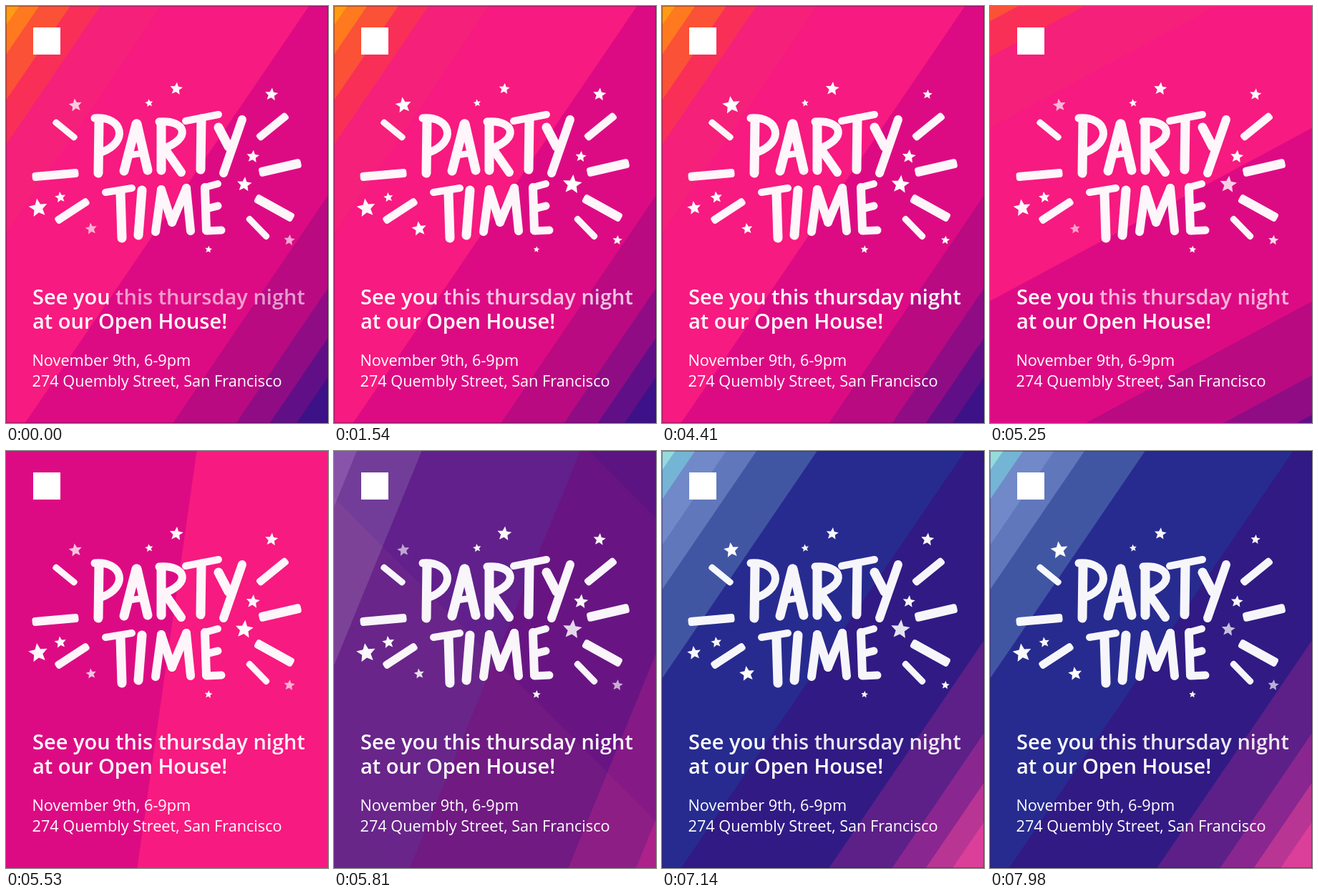
Recreate the animation shown at these times as an HTML page with a canvas. Size 450 px wide and 584 px high, loop 8000 ms.

```html
<!DOCTYPE html>
<html lang="en">
<head>
<meta charset="utf-8">
<title>Party time</title>
<style>
html, body { margin: 0; width: 100%; height: 100%; overflow: hidden; }
canvas { display: block; width: 450px; height: 584px; }
</style>
</head>
<body>
<canvas id="stage" width="450" height="584"></canvas>
<script>
const W = 450, H = 584, LOOP = 8000, STEP = 70;
const ctx = document.getElementById('stage').getContext('2d');
const TAU = Math.PI * 2, DEG = TAU / 360;
const clamp = (v, a = 0, b = 1) => Math.min(b, Math.max(a, v));
const mix = (a, b, u) => a + (b - a) * u;

function layer() {
  const c = document.createElement('canvas');
  c.width = W;
  c.height = H;
  return c;
}

// ---- background: parallel bands, placed by distance from the centre ----
const LEAN = 34.2 * DEG;
const CUTS = [-335, -312, -276, -241, -171, 0, 171, 244, 283, 314];
const PINK = ['#ff9c12', '#ff7a1e', '#fb5136', '#f92f58', '#f5207a', '#f71a80',
  '#dd0b83', '#b90a82', '#900c84', '#610f86', '#3d1188'];
const BLUE = ['#96dbdc', '#74b4d4', '#7189c8', '#6077bc', '#4156a3', '#272b8f',
  '#311a84', '#5c2088', '#8a2690', '#b93593', '#db3f9a'];
const bandLayer = layer();

function bands(colors, turn, zoom, alpha) {
  const g = bandLayer.getContext('2d');
  g.setTransform(1, 0, 0, 1, W / 2, H / 2);
  g.rotate(LEAN + turn * DEG);
  g.scale(zoom, zoom);
  colors.forEach((color, i) => {
    const from = i ? CUTS[i - 1] : -900;
    g.fillStyle = color;
    g.fillRect(from, -900, 900 - from, 1800);
  });
  ctx.globalAlpha = alpha;
  ctx.drawImage(bandLayer, 0, 0);
  if (zoom === 1) {
    ctx.strokeStyle = 'rgba(50,10,60,.4)';
    ctx.strokeRect(0.5, 0.5, W - 1, H - 1);
  }
}

function background(t) {
  const fade = clamp((t - 5600) / 310);
  if (fade < 1) {
    // speeds up, then spins at a steady rate
    const s = Math.max(0, t - 5110), ramp = 162, speed = 0.454;
    const turn = s < ramp ? speed * s * s / (2 * ramp) : speed * (s - ramp / 2);
    bands(PINK, turn, 1 + 0.75 * clamp(s / 420), 1);
  }
  if (fade > 0) {
    const left = Math.max(0, (6090 - t) / 280) ** 2;
    bands(BLUE, -12 * left, 1 + 0.2 * left, fade);
  }
}

// ---- lettering ----
const lettering = layer();
const pen = lettering.getContext('2d');
pen.strokeStyle = pen.fillStyle = '#fff';
pen.lineCap = pen.lineJoin = 'round';

function line(width, x0, y0, x1, y1) {
  pen.lineWidth = width;
  pen.beginPath();
  pen.moveTo(x0, y0);
  pen.lineTo(x1, y1);
  pen.stroke();
}

// a rounded bowl from a stem, bulging to the right
function bowl(x, y, right, bottom, endX) {
  pen.lineWidth = 11;
  pen.beginPath();
  pen.moveTo(x, y);
  pen.bezierCurveTo(right, y - 3, right + 8, bottom - 14, endX, bottom);
  pen.stroke();
}

function party() {
  line(13, 130, 160, 129, 234);
  bowl(124, 157, 164, 205, 133);
  line(13, 182, 165, 165, 231);
  line(13, 183, 165, 198, 230);
  line(9, 172, 209, 192, 206);
  line(13, 217, 164, 217, 230);
  bowl(214, 162, 252, 200, 219);
  line(12, 222, 200, 245, 233);
  line(10, 251, 161, 297, 152);
  line(13, 273, 158, 272, 229);
  line(13, 297, 170, 311, 197);
  line(12, 330, 159, 304, 234);
}

function time() {
  line(10, 139, 261, 176, 255);
  line(13, 160, 262, 162, 325);
  line(13, 190, 258, 185, 321);
  line(12, 217, 257, 209, 316);
  line(12, 217, 257, 232, 303);
  line(12, 252, 255, 232, 303);
  line(12, 252, 255, 258, 315);
  line(12, 278, 254, 280, 314);
  line(10, 278, 254, 296, 249);
  line(11, 280, 284, 296, 280);
  line(11, 280, 315, 301, 314);
}

function ray(x, y, length, thick, angle) {
  pen.save();
  pen.translate(x, y);
  pen.rotate(angle * DEG);
  pen.beginPath();
  pen.roundRect(-length / 2, -thick / 2, length, thick, 4);
  pen.fill();
  pen.restore();
}

function rays() {
  ray(82.5, 173.5, 41, 9, 39);
  ray(69, 236.5, 65, 12, -5);
  ray(92.5, 287, 54, 11, -33);
  ray(372.5, 169, 53, 11, -39);
  ray(383, 226.5, 60, 13, -13);
  ray(375, 283, 60, 13, 29);
  ray(352, 310.5, 42, 9, 46);
}

party();
time();
rays();

// ---- stars: each follows a beat, 0 = smallest, 1 = largest ----
const KEYS = [0, 1540, 4410, 5530, 5810, 7140, 7980];
const SHARED = [.5, 0, .8, .8, 1, .4, .3];
const LEFT = [.15, .65, 1, .15, 0, .5, .9];
const LOW = [.3, .9, .15, 0, 0, 1, .7];
const WIDE = [.9, .9, 0, 1, 1, 0, .9];
const TOP = [1, 1, 0, 1, .8, 1, 0];
const FAR = [1, .5, .2, 1, 1, 0, 1];
const NEAR = [.2, 1, .8, .8, 1, 1, 0];
const LOW_FADE = [.65, 1, 1, .75, .85, 1, 1];
const NEAR_FADE = [1, 1, 1, 1, .83, .87, .72];

function keyed(list, t) {
  let i = 0;
  while (i < KEYS.length - 2 && t >= KEYS[i + 1]) i++;
  const span = KEYS[i + 1] - KEYS[i];
  const u = clamp((t - KEYS[i]) / span);
  const pulse = Math.sin(TAU * Math.round(span / 945) * u);
  return clamp(mix(list[i], list[i + 1], u * u * (3 - 2 * u)) + 0.2 * pulse);
}

function star(x, y, small, large, beat, alpha = 0.97) {
  const r = mix(small, large, beat);
  const tilt = (x < 220 ? -8 : 6) * DEG;
  ctx.globalAlpha = clamp(alpha);
  ctx.beginPath();
  for (let k = 0; k < 10; k++) {
    const angle = k * TAU / 10 - TAU / 4 + tilt;
    const d = k % 2 ? r * 0.46 : r;
    ctx.lineTo(x + d * Math.cos(angle), y + d * Math.sin(angle));
  }
  ctx.closePath();
  ctx.fill();
}

function stars(t) {
  const shared = keyed(SHARED, t), left = keyed(LEFT, t), far = keyed(FAR, t);
  star(238, 116, 8, 10.5, shared);
  star(345, 211, 8, 10.5, shared);
  star(283, 341, 4.5, 6, shared);
  star(76, 268, 7, 9, shared);
  star(200, 136, 4.5, 6, 1 - left / 2);
  star(97, 139, 9, 13, left, 0.6 + left);
  star(119, 312, 7.5, 11, keyed(LOW, t), keyed(LOW_FADE, t));
  star(45, 283, 10, 14, keyed(WIDE, t));
  star(371, 124, 7, 9.5, keyed(TOP, t));
  star(396, 328, 6, 8, far, 1.25 - 0.6 * far);
  star(333, 250, 10, 14, keyed(NEAR, t), keyed(NEAR_FADE, t));
}

function words(t) {
  ctx.globalAlpha = 1;
  ctx.font = '600 29px "Open Sans", "Noto Sans", sans-serif';
  ctx.fillText('See you ', 37, 417.5);
  ctx.fillText('at our Open House!', 37, 452);
  const x = 37 + ctx.measureText('See you ').width;
  ctx.globalAlpha = 0.8 - 0.2 * Math.cos(TAU * t / 1260);
  ctx.fillText('this thursday night', x, 417.5);
  ctx.globalAlpha = 1;
  ctx.font = '400 21.7px "Open Sans", "Noto Sans", sans-serif';
  ctx.fillText('November 9th, 6-9pm', 36.5, 503.5);
  ctx.fillText('274 Quembly Street, San Francisco', 36.5, 532.5);
}

function draw(t) {
  background(t);
  ctx.globalAlpha = 1;
  ctx.fillStyle = '#fff';
  ctx.fillRect(38, 30, 38, 38);
  ctx.globalAlpha = 0.96;
  ctx.drawImage(lettering, 0, 0);
  stars(t);
  words(t);
}

const start = performance.now();
function tick() {
  const t = (performance.now() - start) % LOOP;
  draw(Math.floor(t / STEP) * STEP);
  requestAnimationFrame(tick);
}
tick();
</script>
</body>
</html>
```
